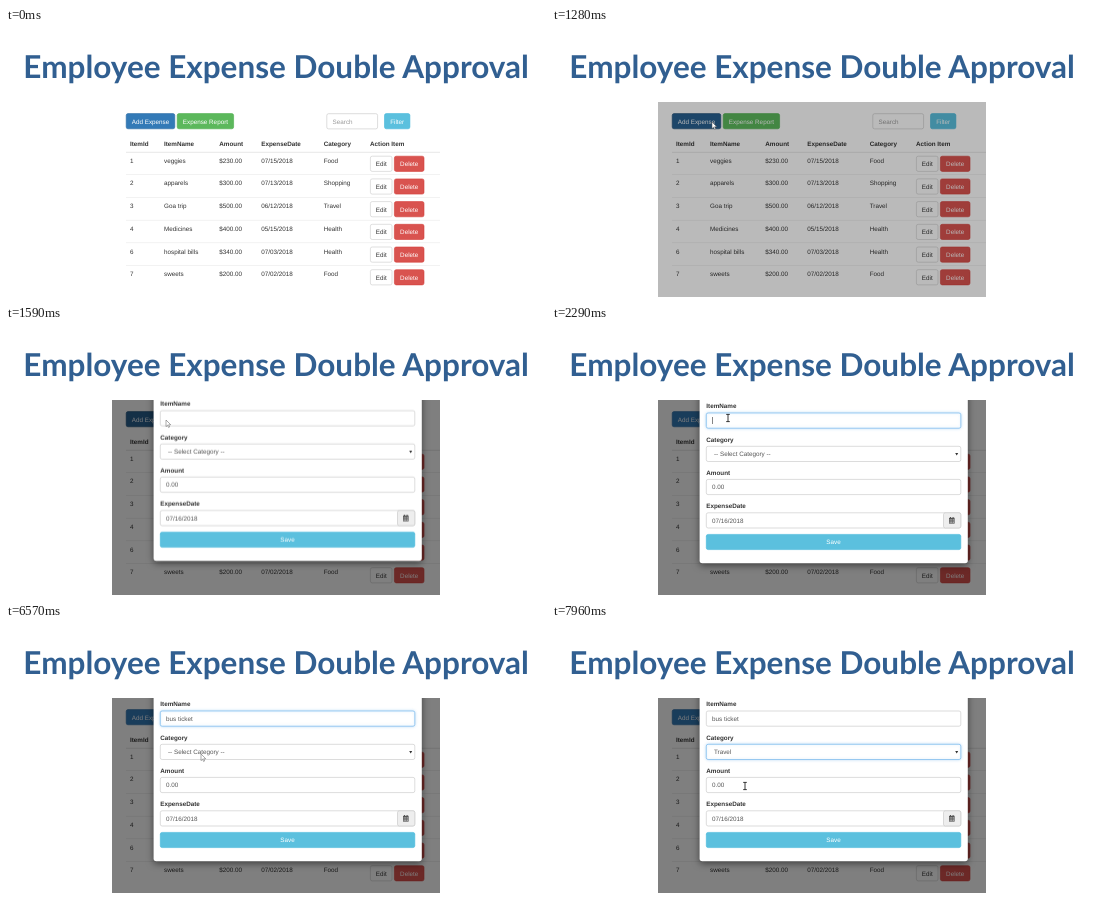
Animation of 540x270 px, one loop 8000 ms. Source, as an HTML page with a canvas:

```html
<!DOCTYPE html>
<html lang="en">
<head>
<meta charset="utf-8">
<title>Employee Expense Double Approval</title>
<style>
  html, body { margin: 0; height: 100%; overflow: hidden; background: #fff; }
  canvas { display: block; }
</style>
</head>
<body>
<canvas id="stage" width="540" height="270"></canvas>
<script>
const stage = document.getElementById('stage').getContext('2d');
const layer = stage.canvas.cloneNode().getContext('2d');
stage.textRendering = layer.textRendering = 'geometricPrecision';
let ctx = stage;

const LOOP = 8000;
const SANS = '"Liberation Sans", Arial, sans-serif';
const COLUMNS = [124, 158, 213.3, 255.3, 317.7, 364];
const HEADERS = ['ItemId', 'ItemName', 'Amount', 'ExpenseDate', 'Category', 'Action Item'];
const ROWS = [
  ['1', 'veggies', '$230.00', '07/15/2018', 'Food'],
  ['2', 'apparels', '$300.00', '07/13/2018', 'Shopping'],
  ['3', 'Goa trip', '$500.00', '06/12/2018', 'Travel'],
  ['4', 'Medicines', '$400.00', '05/15/2018', 'Health'],
  ['6', 'hospital bills', '$340.00', '07/03/2018', 'Health'],
  ['7', 'sweets', '$200.00', '07/02/2018', 'Food'],
];
const OPTIONS = ['-- Select Category --', 'Food', 'Shopping', 'Travel', 'Health'];
const TYPED = 'bus ticket';
const KEY_TIMES = [2900, 3300, 3530, 4000, 4350, 4690, 4940, 5170, 5320, 5630];
// time, x, y of the pointer's hot spot
const POINTER = [
  [270, 400, 246], [830, 160, 94], [1890, 160, 94], [2290, 176, 92],
  [6160, 176, 92], [6560, 195, 130], [7000, 195, 130], [7180, 194, 146],
  [7320, 194, 146], [7590, 193, 162],
];

const ramp = (t, from, to) => Math.min(1, Math.max(0, (t - from) / (to - from)));
const between = (t, from, to) => t >= from && t < to;

function pointerAt(t) {
  let [, x, y] = POINTER[0];
  for (let i = 1; i < POINTER.length; i++) {
    const p = ramp(t, POINTER[i - 1][0], POINTER[i][0]);
    const k = p * p * (3 - 2 * p);
    x += (POINTER[i][1] - POINTER[i - 1][1]) * k;
    y += (POINTER[i][2] - POINTER[i - 1][2]) * k;
  }
  return [x, y];
}

function text(s, x, y, color = '#333', weight = 'normal', align = 'left') {
  ctx.font = `${weight} 6.3px ${SANS}`;
  ctx.textAlign = align;
  ctx.fillStyle = color;
  ctx.fillText(s, x, y);
}

function box(x, y, w, h, fill, stroke, radius = 1.8) {
  ctx.beginPath();
  ctx.roundRect(x, y, w, h, radius);
  ctx.fillStyle = fill;
  ctx.fill();
  if (!stroke) return;
  ctx.strokeStyle = stroke;
  ctx.lineWidth = 0.6;
  ctx.stroke();
}

function button(label, x, y, w, fill, stroke, color = '#fff') {
  box(x, y, w, 15.2, fill, stroke);
  text(label, x + w / 2, y + 9.9, color, 'normal', 'center');
}

function field(y, value, focus = 0, color = '#555', x = 154.3, w = 254.5, indent = 5.8) {
  ctx.save();
  if (focus) {
    ctx.shadowColor = `rgba(102,175,233,${0.45 * focus})`;
    ctx.shadowBlur = 3;
  }
  box(x, y, w, 15.2, '#fff', focus > 0.3 ? '#66afe9' : '#c4c4c4');
  ctx.restore();
  text(value, x + indent, y + 9.9, color);
}

function drawTable(t) {
  const hover = between(t, 800, 1890);
  button('Add Expense', 120.2, 85.6, 48.6, hover ? '#286090' : '#337ab7', hover ? '#204d74' : '#2e6da4');
  button('Expense Report', 171.2, 85.6, 56.4, '#5cb85c', '#4cae4c');
  field(85.7, 'Search', 0, '#999', 320.8, 50.8);
  button('Filter', 378.5, 85.6, 25.4, '#5bc0de', '#46b8da');

  HEADERS.forEach((h, i) => text(h, COLUMNS[i], 117.8, '#333', 'bold'));
  ROWS.forEach((row, r) => {
    const top = 124.3 + 22.7 * r;
    ctx.fillStyle = '#e4e4e4';
    ctx.fillRect(120, top - 0.5, 314, r ? 0.5 : 0.9);
    row.forEach((cell, c) => text(cell, COLUMNS[c], top + 10.4));
    button('Edit', 364.4, top + 3.9, 21.6, '#fff', '#ccc', '#333');
    button('Delete', 388.4, top + 3.9, 29.6, '#d9534f', '#d43f3a');
  });
}

function drawCalendar(x, y) {
  ctx.fillStyle = '#555';
  ctx.fillRect(x - 2.8, y - 2.6, 5.6, 5.8);
  ctx.fillRect(x - 1.8, y - 3.4, 1, 1);
  ctx.fillRect(x + 0.8, y - 3.4, 1, 1);
  ctx.fillStyle = '#ccc';
  for (let i = 0; i < 9; i++) {
    ctx.fillRect(x - 2.2 + 1.6 * (i % 3), y - 1 + 1.3 * Math.floor(i / 3), 1.1, 0.8);
  }
}

function drawOptions(t) {
  const active = t < 7110 ? 0 : t < 7400 ? 1 : t < 7520 ? 2 : 3;
  box(154.3, 135.3, 254.5, 40.5, '#fff', '#8a8a8a', 0);
  OPTIONS.forEach((option, i) => {
    const y = 135.6 + 8 * i;
    if (i === active) {
      ctx.fillStyle = '#1e90ff';
      ctx.fillRect(154.6, y, 253.9, 8);
    }
    text(option, 162, y + 6.2, i === active ? '#fff' : '#333');
  });
}

function drawModal(t) {
  ctx.save();
  ctx.shadowColor = 'rgba(0,0,0,.5)';
  ctx.shadowBlur = 7;
  ctx.shadowOffsetY = 2.2;
  box(147.6, 18, 268.2, 219.2, '#fff', null, 2.7);
  ctx.restore();

  ['ItemName', 'Category', 'Amount', 'ExpenseDate'].forEach((label, i) =>
    text(label, 154.3, 82.4 + 33.2 * i, '#333', 'bold'));

  const value = TYPED.slice(0, KEY_TIMES.filter(k => t >= k).length);
  field(87, value, ramp(t, 2140, 2290) * (1 - ramp(t, 6700, 6850)));
  if (between(t, 2200, 2670) || between(t, 2900, 6160)) {
    ctx.fillStyle = '#333';
    ctx.fillRect(160.1 + ctx.measureText(value).width, 91, 0.6, 7);
  }

  field(120.3, t < 7890 ? OPTIONS[0] : 'Travel', ramp(t, 6700, 6850), '#555', 154.3, 254.5, 7.7);
  ctx.fillStyle = '#333';
  ctx.beginPath();
  ctx.moveTo(403.2, 126.9);
  ctx.lineTo(406.2, 126.9);
  ctx.lineTo(404.7, 129.5);
  ctx.fill();

  field(153.4, '0.00');
  field(186.8, '07/16/2018');
  box(391.5, 186.8, 17.3, 15.2, '#eee', '#c4c4c4');
  drawCalendar(399.8, 194.4);
  button('Save', 154.3, 208.4, 254.5, '#5bc0de', '#46b8da');

  if (between(t, 6850, 7890)) drawOptions(t);
}

// The dialog is composed on its own layer so that it fades as one piece.
function fadeInModal(t) {
  ctx = layer;
  ctx.clearRect(0, 0, 540, 270);
  drawModal(t);
  ctx = stage;
  const left = (1 - ramp(t, 1350, 1650)) ** 1.95;
  ctx.globalAlpha = ramp(t, 1375, 1525);
  ctx.drawImage(layer.canvas, 0, -56 * left);
  ctx.globalAlpha = 1;
}

function drawPointer(t) {
  if (t < 270) return;
  const [x, y] = pointerAt(t);
  ctx.save();
  ctx.translate(x, y);
  ctx.beginPath();
  if (between(t, 1890, 6400) || t >= 7890) {
    ctx.moveTo(-1.8, -3.6);
    ctx.lineTo(1.8, -3.6);
    ctx.moveTo(0, -3.6);
    ctx.lineTo(0, 3.6);
    ctx.moveTo(-1.8, 3.6);
    ctx.lineTo(1.8, 3.6);
    ctx.strokeStyle = '#222';
    ctx.lineWidth = 0.9;
  } else {
    [[0, 0], [0, 6.6], [1.5, 5.2], [2.6, 7.5], [3.6, 7], [2.6, 4.8], [4.7, 4.7]]
      .forEach(p => ctx.lineTo(...p));
    ctx.closePath();
    ctx.fillStyle = '#fff';
    ctx.fill();
    ctx.strokeStyle = '#555';
    ctx.lineWidth = 0.5;
  }
  ctx.stroke();
  ctx.restore();
}

function draw(t) {
  ctx.fillStyle = '#fff';
  ctx.fillRect(0, 0, 540, 270);
  ctx.font = 'bold 31.5px Lato, sans-serif';
  ctx.textAlign = 'center';
  ctx.fillStyle = '#315f91';
  ctx.fillText('Employee Expense Double Approval', 270.1, 50);

  ctx.save();
  ctx.beginPath();
  ctx.rect(106, 74, 328, 195);
  ctx.clip();
  drawTable(t);
  ctx.fillStyle = `rgba(0,0,0,${0.5 * ramp(t, 1200, 1350)})`;
  ctx.fillRect(106, 74, 328, 195);
  if (t > 1350) fadeInModal(t);
  drawPointer(t);
  ctx.restore();
}

function tick() {
  draw(performance.now() % LOOP);
  requestAnimationFrame(tick);
}
tick();
</script>
</body>
</html>
```
